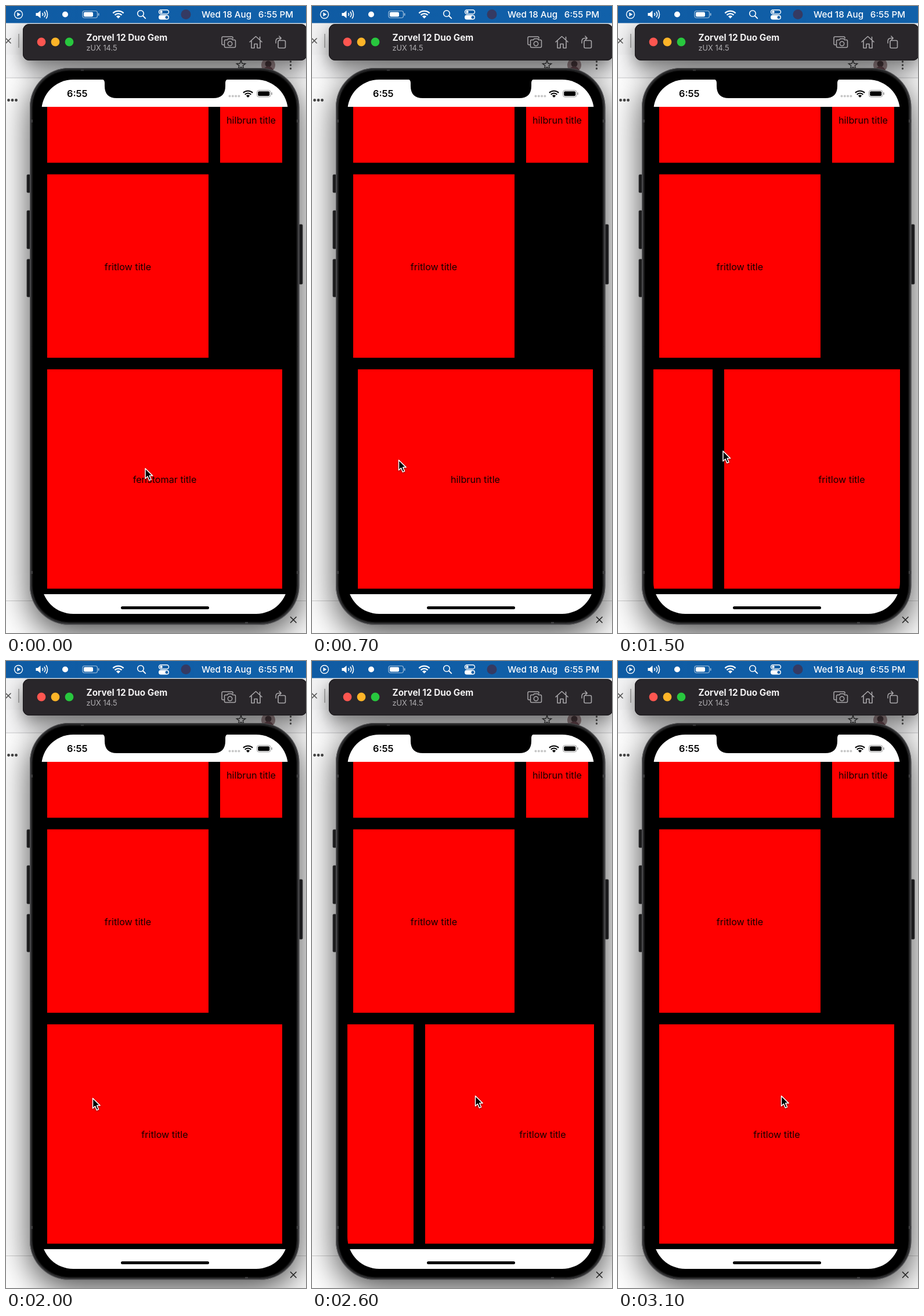
An HTML page with a canvas that plays this animation: 517x1082 px, repeating every 3200 ms.

```html
<!DOCTYPE html>
<html lang="en">
<head>
<meta charset="utf-8">
<title>Carousel in a phone simulator</title>
<style>
html, body { margin: 0; width: 100%; height: 100%; overflow: hidden; background: #fff; }
canvas { display: block; width: 517px; height: 1082px; }
</style>
</head>
<body>
<canvas id="stage"></canvas>
<script>
const W = 517, H = 1082, LOOP = 3200, TICK = 100;
const PITCH = 425, SETTLE = 88;
const RED = '#ff0000', FONT = 'Inter, "Open Sans", sans-serif';
const TITLES = ['fenstomar title', 'hilbrun title', 'fritlow title'];

const canvas = document.getElementById('stage');
const c = canvas.getContext('2d');
const dpr = window.devicePixelRatio || 1;
canvas.width = W * dpr;
canvas.height = H * dpr;

// ---------- helpers ----------
function rect(x, y, w, h, fill) {
  c.fillStyle = fill;
  c.fillRect(x, y, w, h);
}

function box(x, y, w, h, r, fill, stroke, lw = 1) {
  c.beginPath();
  c.roundRect(x, y, w, h, r);
  paint(fill, stroke, lw);
}

function disc(x, y, r, fill, stroke, lw = 1) {
  c.beginPath();
  c.arc(x, y, r, 0, Math.PI * 2);
  paint(fill, stroke, lw);
}

function shape(d, fill, stroke, lw = 1, x = 0, y = 0) {
  const p = new Path2D(d);
  c.save();
  c.translate(x, y);
  c.lineJoin = c.lineCap = 'round';
  if (fill) { c.fillStyle = fill; c.fill(p); }
  if (stroke) { c.strokeStyle = stroke; c.lineWidth = lw; c.stroke(p); }
  c.restore();
}

function paint(fill, stroke, lw) {
  if (fill) { c.fillStyle = fill; c.fill(); }
  if (stroke) { c.strokeStyle = stroke; c.lineWidth = lw; c.stroke(); }
}

function text(s, x, y, size, weight, color, align = 'left') {
  c.font = `${weight} ${size}px ${FONT}`;
  c.textAlign = align;
  c.fillStyle = color;
  c.fillText(s, x, y);
}

function shadowed(blur, dy, alpha, draw) {
  c.save();
  c.shadowColor = `rgba(0,0,0,${alpha})`;
  c.shadowBlur = blur * dpr;
  c.shadowOffsetY = dy * dpr;
  draw();
  c.restore();
}

function wifi(x, y, r, color) {
  const a = -Math.PI * 0.75, b = -Math.PI * 0.25;
  for (const k of [0.92, 0.6]) {
    c.beginPath();
    c.arc(x, y, r * k, a, b);
    paint(null, color, r * 0.17);
  }
  c.beginPath();
  c.moveTo(x, y);
  c.arc(x, y, r * 0.36, a, b);
  c.closePath();
  paint(color);
}

// ---------- desktop ----------
function browser() {
  rect(0, 0, W, H, '#ffffff');
  rect(0, 30, W, 54, '#f4f4f5');
  rect(0, 84, W, 40, '#f8f8f9');
  rect(0, 123.5, W, 1, '#c9c9cb');
  rect(0, 1026, W, 1, '#cfcfcf');
  shape('M0 56l8 8M8 56l-8 8', null, '#555', 1.6);
  rect(21.5, 48, 1, 24, '#777');
}

function browserIcons() {
  c.beginPath();
  for (let i = 0; i < 10; i++) {
    const r = i % 2 ? 3.4 : 8, a = i * Math.PI / 5 - Math.PI / 2;
    c.lineTo(405 + r * Math.cos(a), 102 + r * Math.sin(a));
  }
  c.closePath();
  paint(null, '#3c3c3e', 1.4);
  c.save();
  c.beginPath();
  c.arc(452, 102, 12, 0, Math.PI * 2);
  c.clip();
  rect(440, 90, 24, 24, '#a58f92');
  disc(452, 100, 5.5, '#4c3a3e');
  disc(452, 113, 9, '#6b4a52');
  c.restore();
  for (const y of [96, 102, 108]) disc(490.5, y, 1.7, '#555');
  for (const x of [4.5, 11, 17.5]) disc(x, 162.5, 2.4, '#444');
  shape('M490.5 1054.5l9.5 9.5M500 1054.5l-9.5 9.5', null, '#333', 1.7);
}

function menuBar() {
  const g = c.createLinearGradient(0, 0, W, 0);
  g.addColorStop(0, '#0f5ba3');
  g.addColorStop(1, '#1161aa');
  rect(0, 0, W, 29.5, g);
  const w = '#fff';
  disc(21.5, 14.5, 7, null, w, 1.4);
  shape('M19.3 11v7l5.8-3.5z', w);
  shape('M51.5 12h3.2l4.8-4v13l-4.8-4h-3.2z', w);
  for (const r of [4, 8, 12]) {
    c.beginPath();
    c.arc(59.5, 14.5, r, -0.65, 0.65);
    paint(null, w, 1.6);
  }
  disc(102, 14.5, 5, w);
  box(132, 8.5, 25.5, 12, 3.5, null, 'rgba(255,255,255,.6)', 1.2);
  box(134, 10.5, 16, 8, 2, w);
  box(158.8, 12.3, 1.7, 4.5, 1, 'rgba(255,255,255,.6)');
  wifi(193.5, 21.5, 14, w);
  disc(232, 13, 5.3, null, w, 1.6);
  shape('M236 17l4.3 4.3', null, w, 1.8);
  box(263.5, 6.7, 17, 7, 3.5, null, w, 1.4);
  disc(267.5, 10.2, 2.2, w);
  box(263, 15.5, 18, 8, 4, w);
  disc(277, 19.5, 2.5, '#1560a7');
  disc(310, 14.5, 8.5, '#353a62');
  text('Wed 18 Aug', 337, 19.5, 15.2, 500, w);
  text('6:55 PM', 495, 19.5, 15.2, 500, w, 'right');
}

function toolbar() {
  shadowed(34, 12, 0.55, () => box(29, 31, 490, 63, 11, '#29262a'));
  box(29.5, 31.5, 489, 62, 10.5, null, '#171518', 1);
  ['#fd5650', '#fdb428', '#28c73e'].forEach((col, i) => disc(61 + i * 24, 62, 7.4, col));
  text('Zorvel 12 Duo Gem', 138.5, 60, 15.3, 700, '#f3f2f3');
  text('zUX 14.5', 138.5, 77, 12.8, 400, '#b0aeb1');
  const k = '#a9a7aa';
  shape('M376 67h-2q-2 0-2-2v-10q0-2 2-2h15q2 0 2 2v1', null, k, 1.5);
  shape('M378.5 58.5h3l1.5-2h6l1.5 2h3q2 0 2 2v9q0 2-2 2h-15q-2 0-2-2v-9q0-2 2-2z', '#29262a', k, 1.5);
  disc(386, 65, 3.7, null, k, 1.5);
  shape('M420 62l10.5-9.5 10.5 9.5M423 60v12.5h5v-7h5v7h5v-12.5M437.5 58v-4.5', null, k, 1.6);
  box(469, 59.5, 12.5, 13, 2, null, k, 1.6);
  shape('M465 64v-3q0-5.5 5.5-5.5h3M470.8 52l3.4 3.5-3.4 3.5', null, k, 1.5);
}

// ---------- phone ----------
function phoneBody() {
  const side = '#29292b', rim = '#4b4b4d';
  for (const [x, y, h] of [[36, 291, 31], [36, 353, 66], [36, 437, 65], [505, 377, 103]])
    box(x, y, 6, h, 1.5, side, rim, 0.8);
  shadowed(58, 16, 0.72, () => box(41, 107, 464.5, 961, 68, '#2d2d2f'));
  box(41.7, 107.7, 463, 959.5, 67, '#252527', '#59595b', 1.4);
  box(44, 110, 458.5, 955, 65, '#111', '#3a3a3c', 1);
  box(46.5, 112.5, 453.5, 950, 62, '#000');
  for (const x of [42, 501]) {
    rect(x, 196, 4, 5, '#3d3d3f');
    rect(x, 975, 4, 5, '#3d3d3f');
  }
  rect(129, 108, 5, 4, '#3d3d3f');
  rect(412, 1063, 5, 4, '#3d3d3f');
}

function statusBar() {
  rect(61, 127, 425, 47, '#fff');
  shape('M163 126q7 0 7 7v5q0 21 21 21h166q21 0 21-21v-5q0-7 7-7z', '#000');
  text('6:55', 105, 157, 16.3, 600, '#000');
  for (let i = 0; i < 4; i++) disc(385.5 + i * 5.3, 155.5, 2, '#c6c6c6');
  wifi(417, 158, 12.5, '#000');
  box(432.5, 145.5, 23.5, 11.5, 3.5, null, '#999', 1);
  box(434.2, 147.2, 20, 8, 2, '#000');
  box(457.2, 149, 1.6, 4.5, 1, '#999');
}

function card(x, y, w, h, title, mid = y + h / 2) {
  rect(x, y, w, h, RED);
  if (title) text(title, x + w / 2, mid + 6, 16.2, 400, '#150000', 'center');
}

function screen(scroll) {
  c.save();
  c.beginPath();
  c.roundRect(61, 127, 425, 922, 55);
  c.clip();
  rect(61, 127, 425, 922, '#000');
  card(71, 170, 278, 100.5);
  card(369, 170, 107, 100.5, TITLES[1], 197);
  card(71, 290.5, 278, 316.5, TITLES[2], 449.5);
  TITLES.forEach((title, i) => card(71 + i * PITCH - scroll, 627, 405, 378.5, title, 816.5));
  statusBar();
  rect(61, 1015, 425, 34, '#fff');
  box(198, 1036, 152, 5, 2.5, '#000');
  c.restore();
}

// ---------- motion ----------
// Short finger drag, then an exponential glide to the next page.
function swipe(u) {
  if (u <= 0) return 0;
  return u < 100 ? 0.18 * u / 100 : 1 - 0.82 * Math.exp((100 - u) / SETTLE);
}

const smooth = u => u * u * (3 - 2 * u);
const clamp = u => Math.min(1, Math.max(0, u));

// Pull towards the previous page, then spring back.
function pull(t) {
  return t <= 2600 ? 124 * smooth(clamp((t - 2200) / 400)) : 124 * Math.exp((2600 - t) / 70);
}

function scrollAt(t) {
  return Math.round(PITCH * (swipe(t - 268) + swipe(t - 1300)) - pull(t));
}

const POINTER = [
  [0, 239.5, 797.5], [260, 239.5, 797], [440, 168, 788], [600, 149, 783], [800, 149, 783],
  [1200, 258, 751.5], [1300, 258, 751.5], [1500, 180.5, 767.5], [1700, 149, 754],
  [2180, 149, 754], [2600, 281, 750], [LOOP, 281, 750]
];

function pointerAt(t) {
  const i = POINTER.findIndex(p => p[0] > t);
  const [t0, x0, y0] = POINTER[i - 1], [t1, x1, y1] = POINTER[i];
  const k = smooth((t - t0) / (t1 - t0));
  return [x0 + (x1 - x0) * k, y0 + (y1 - y0) * k];
}

function pointer(x, y) {
  const arrow = 'M0.5 0.5v17.5l4-3.7 2.9 6.8 3.2-1.4-2.9-6.6h5.5z';
  shadowed(3, 1, 0.4, () => shape(arrow, '#000', '#fff', 1.5, x, y));
}

function render(t) {
  c.setTransform(dpr, 0, 0, dpr, 0, 0);
  browser();
  browserIcons();
  phoneBody();
  toolbar();
  menuBar();
  screen(scrollAt(t));
  pointer(...pointerAt(t));
}

let last = -1;
const start = performance.now();
function loop() {
  const t = Math.floor((performance.now() - start) % LOOP / TICK) * TICK;
  if (t !== last) render(last = t);
  requestAnimationFrame(loop);
}
loop();
</script>
</body>
</html>
```
